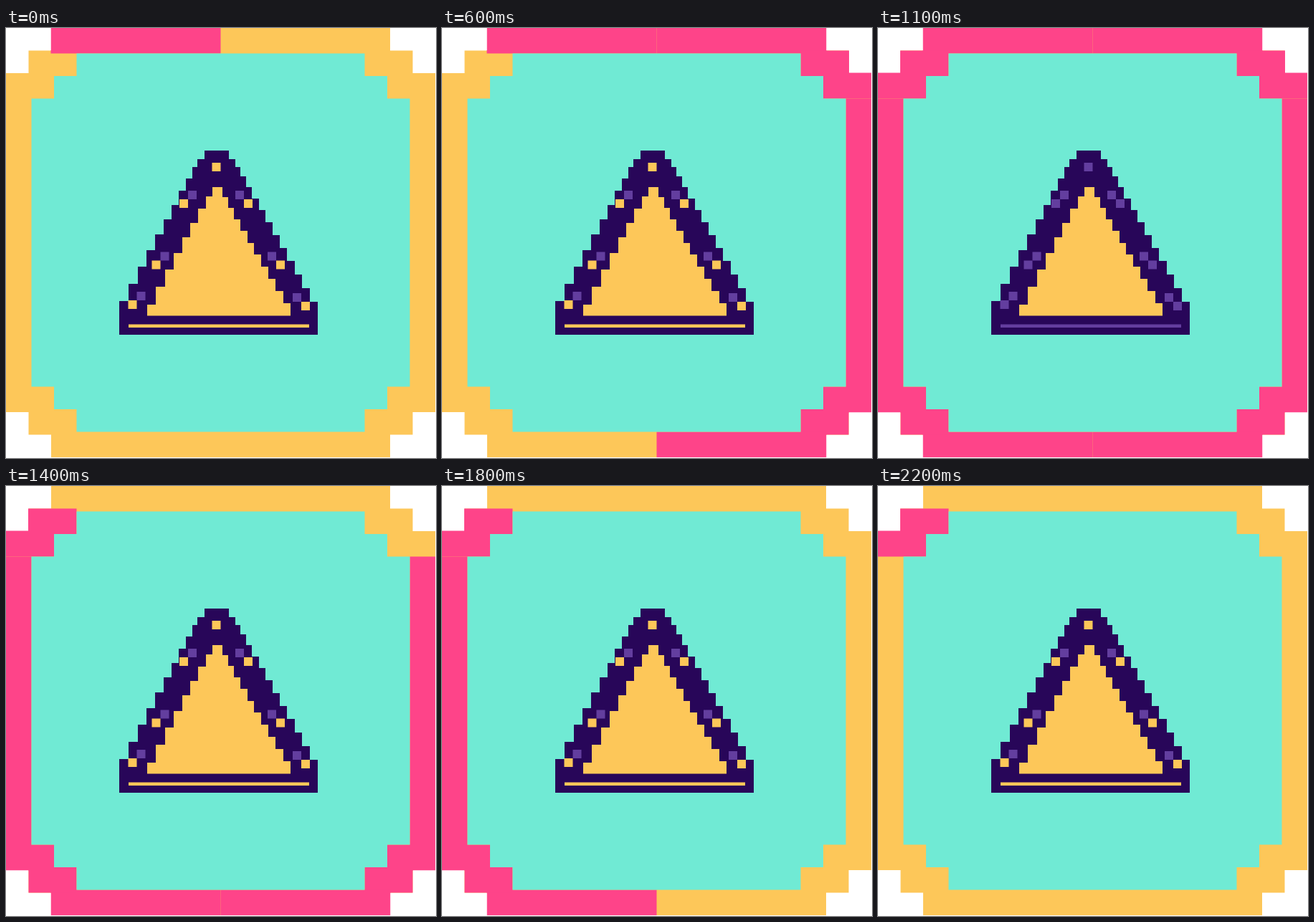
Recreate the animation shown at these times as an HTML page with a canvas. Size 600 by 600 pixels, loop 2.3 s.

```html
<!DOCTYPE html>
<html lang="en">
<head>
<meta charset="utf-8">
<title>Pixel triangle</title>
<style>
html, body { margin: 0; width: 100%; height: 100%; overflow: hidden; background: #fff; }
canvas { display: block; }
</style>
</head>
<body>
<canvas id="stage" width="600" height="600"></canvas>
<script>
const ctx = document.getElementById('stage').getContext('2d');
const YELLOW = '#fdc759', PINK = '#fe4489', TEAL = '#70ead4', DARK = '#280659', PURPLE = '#633e9f';
const STEP = 100, STEPS = 23;
const SIZE = 599, UNIT = 31.5, THICK = 35.5, LIGHT = 12;

// A square with stepped corners, as three overlapping rectangles.
function steppedSquare(inset) {
  const path = new Path2D();
  for (let i = 0; i < 3; i++) {
    const x = inset + UNIT * (2 - i), y = inset + UNIT * i;
    path.rect(x, y, SIZE - 2 * x, SIZE - 2 * y);
  }
  return path;
}

// Clockwise regions [left, top, right, bottom]; the stepped square trims them.
function borderRegions() {
  const mid = SIZE / 2, split = 284;
  const lo = 2 * UNIT - 0.5, hi = SIZE - lo;
  const near = THICK + 2 * UNIT, far = SIZE - near;
  const edge = SIZE - THICK, corner = SIZE - UNIT;
  return [
    [lo, 0, mid, THICK], [mid, 0, hi, THICK], [far, UNIT, SIZE, near],
    [edge, near, SIZE, split], [edge, split, SIZE, hi], [far, far, corner, corner],
    [mid, edge, hi, SIZE], [lo, edge, mid, SIZE], [UNIT, far, near, corner],
    [0, SIZE - split, THICK, hi], [0, near, THICK, SIZE - split], [0, UNIT, near, near]
  ];
}

// Stairs of n steps whose run and rise grow by powers px and py.
function stairs([x0, y0], [x1, y1], n, px, py) {
  const at = (a, b, i, p) => Math.round(a + (b - a) * (i / n) ** p);
  const points = [[x0, y0]];
  for (let i = 1; i <= n; i++) {
    const y = at(y0, y1, i, py);
    points.push([points.at(-1)[0], y], [at(x0, x1, i, px), y]);
  }
  return points;
}

function pyramid(left, right, bottom) {
  const path = new Path2D();
  const foot = points => [points.at(-1)[0], bottom];
  for (const p of [...right, foot(right), foot(left), ...left.reverse()]) path.lineTo(...p);
  path.closePath();
  return path;
}

const frame = steppedSquare(0), pinkFrame = steppedSquare(-0.5), inside = steppedSquare(THICK);
const regions = borderRegions();

const outer = pyramid(
  stairs([267, 183], [158, 381], 10, 1.2, 1.24),
  stairs([320, 183], [435, 382], 12, 1.15, 1.17), 428);
outer.rect(277, 171, 34, 12);
const inner = pyramid(
  stairs([288, 222], [197, 386], 8, 1.1, 1.22),
  stairs([302, 222], [397, 384], 10, 1.1, 1.06), 401.5);

// Each steady light has a blinking one diagonally below it, away from the middle.
const steady = [[254, 227], [320, 227], [215.5, 312.5], [365, 312.5], [182.5, 368], [400, 370]];
const blinking = steady.map(([x, y]) => [x + LIGHT * Math.sign(x - 290), y + LIGHT]);
blinking.push([287.5, 188]);

function fillPath(color, path) {
  ctx.fillStyle = color;
  ctx.fill(path);
}

function drawBorder(step) {
  fillPath(YELLOW, frame);
  ctx.save();
  ctx.clip(pinkFrame);
  ctx.fillStyle = PINK;
  // Pink grows around the border, then is cleared in the same order.
  const first = Math.max(0, step - regions.length + 1);
  for (const [l, t, r, b] of regions.slice(first, step + 1)) ctx.fillRect(l, t, r - l, b - t);
  ctx.restore();
  fillPath(TEAL, inside);
}

function drawLights(color, spots) {
  ctx.fillStyle = color;
  for (const [x, y] of spots) ctx.fillRect(x, y, LIGHT, LIGHT);
}

function draw(now) {
  const step = Math.floor(now / STEP) % STEPS;
  ctx.clearRect(0, 0, 600, 600);
  drawBorder(step);
  fillPath(DARK, outer);
  fillPath(YELLOW, inner);
  drawLights(PURPLE, steady);
  drawLights(step % 2 ? PURPLE : YELLOW, blinking);
  ctx.fillRect(171, 413.5, 252, 4.5);
}

const start = performance.now();
function tick() {
  draw(performance.now() - start);
  requestAnimationFrame(tick);
}
tick();
</script>
</body>
</html>
```
